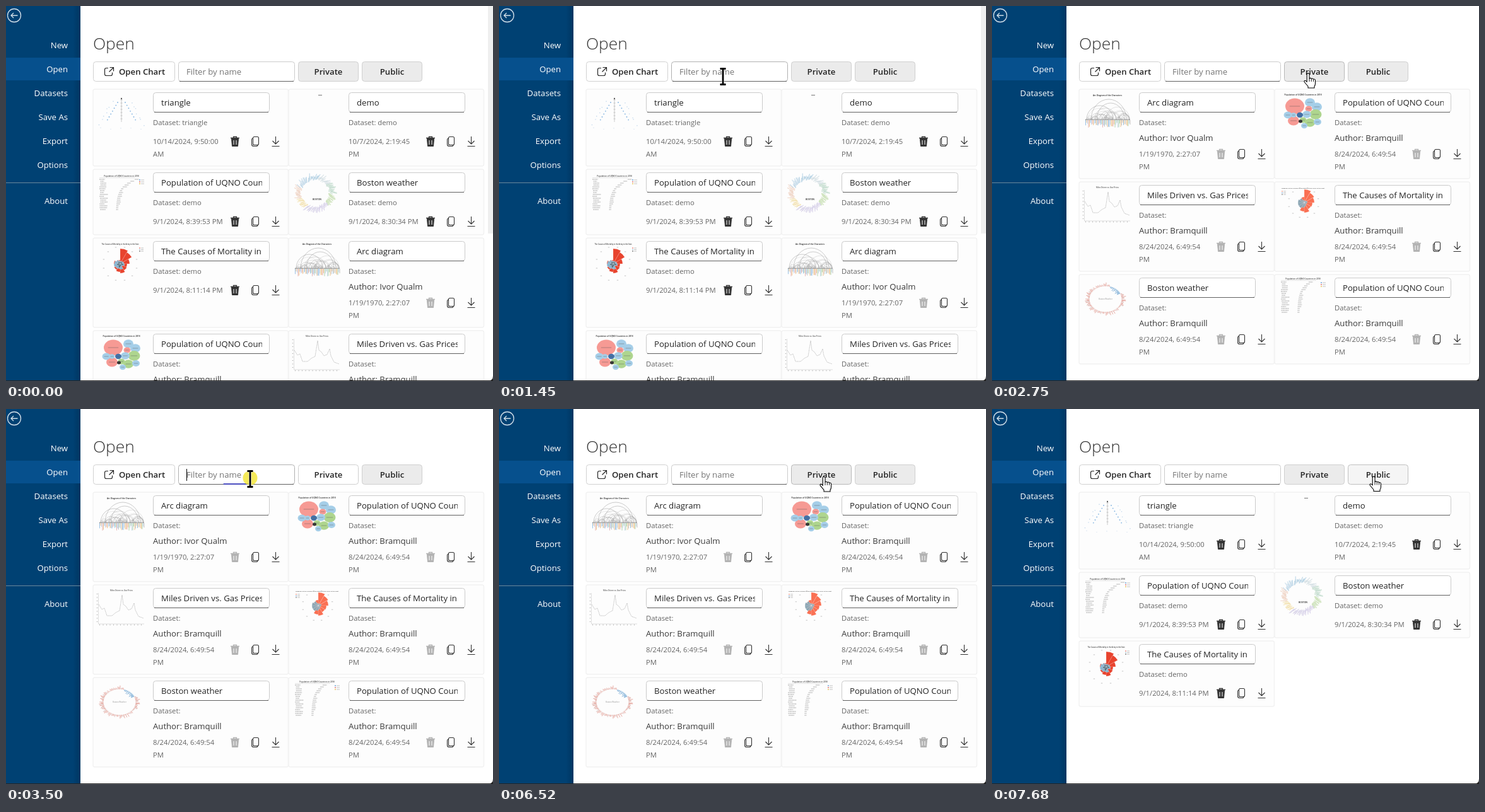
Animation of 772 by 595 pixels, one loop 8 s. Source, as an HTML page:

```html
<!DOCTYPE html>
<html lang="en">
<head>
<meta charset="utf-8">
<title>Open chart</title>
<style>
  html, body { margin: 0; width: 100%; height: 100%; overflow: hidden; background: #fff; }
  svg { display: block; width: 100vw; height: 100vh; }
  text { font-family: "Open Sans", "Noto Sans", sans-serif; white-space: pre; }
</style>
</head>
<body>
<svg id="stage" viewBox="0 0 772 595" xmlns="http://www.w3.org/2000/svg"></svg>
<script>
const LOOP = 8000;
const FONT_SCALE = 0.94;
const INK = '#242424', MUTED = '#666';

// ---- drawing helpers ----
const text = (x, y, s, size, fill = INK, more = '') =>
  `<text x="${x}" y="${y}" font-size="${size * FONT_SCALE}" fill="${fill}" ${more}>${s}</text>`;
const tiny = (x, y, s, size = 3.2, fill = '#444') =>
  text(x, y, s, size, fill, 'text-anchor="middle" font-weight="600"');
const rect = (x, y, w, h, fill, more = '') =>
  `<rect x="${x}" y="${y}" width="${w}" height="${h}" fill="${fill}" ${more}/>`;
const path = (d, stroke, width = 1, fill = 'none', more = '') =>
  `<path d="${d}" stroke="${stroke}" stroke-width="${width}" fill="${fill}" ${more}/>`;
const dot = (x, y, r, fill) => `<circle cx="${x}" cy="${y}" r="${r}" fill="${fill}"/>`;
const group = (x, y, body, id = '') => `<g ${id && `id="${id}"`} transform="translate(${x} ${y})">${body}</g>`;
const repeat = (n, fn) => Array.from({ length: n }, (_, i) => fn(i)).join('');
const random = seed => () => (seed = (seed * 16807) % 2147483647) / 2147483647;
const polar = (cx, cy, r, a, squash = 1) => [cx + r * Math.cos(a), cy + r * squash * Math.sin(a)];

// ---- thumbnails, in card coordinates ----
function triangleThumb() {
  const r = random(41);
  const sides = repeat(7, i => [-1, 1].map(s =>
    dot(45 + s * (6 + i * 2.7), 21 + i * 4.6, .9, '#7fb2e0') +
    dot(45 + s * (13 + i * 3.3 + r() * 4), 17 + i * 6 + r() * 6, .8, '#c3d8ec')).join(''));
  const ticks = repeat(7, i => `M43.5 ${17 + i * 5}h3`);
  return path('M45 13V52' + ticks, '#999', .5) + dot(45, 15, 1, '#333') + sides +
    repeat(5, i => dot(12 + i * 16, 61 + r() * 3, .6, '#c5d6e8'));
}

const demoThumb = () => path('M47 9.5h6', '#888', 1.2);

function barsThumb(dy = 0, span = 30) {
  const r = random(17);
  const rows = repeat(17, i => {
    const y = 16 + i * 3, end = 36 + span * Math.exp(-i / 4);
    return path(`M${10 + r() * 2} ${y}H${17 + r() * 7}`, '#999', .9, 'none', 'stroke-dasharray="2 .5"') +
      path(`M${end} ${y}h${3 + r() * 4}`, '#999', .9, 'none', 'stroke-dasharray="1.5 .4"');
  });
  const legend = ['#5b9bd5', '#d66', '#e5c04a'].map((c, i) =>
    dot(74, 17 + i * 3, .9, c) + path(`M76 ${17 + i * 3}h5`, '#aaa', .7)).join('');
  return group(0, dy, tiny(45, 12, 'Population of UQNO Countries in 2018') +
    path('M10 13.5H66', '#bbb', .4) + rows + legend);
}

function wreathThumb() {
  const r = random(77);
  const colors = ['#cfe3bd', '#d9d3ea', '#dbd6ea', '#f3e3b5', '#f0d6c8', '#c5dbea', '#bcd6e6', '#d8e2e6', '#c8dfd2'];
  const rays = repeat(150, i => {
    const a = i / 150 * 2 * Math.PI, inner = 21 + r() * 4, outer = inner + 3 + r() * 8;
    const [x1, y1] = polar(42, 38, inner, a, .95), [x2, y2] = polar(42, 38, outer, a + .1, .93);
    return path(`M${x1} ${y1}L${x2} ${y2}`, colors[Math.floor(i / 150 * 9)], 1.1);
  });
  return rays + tiny(45, 49, 'BOSTON', 3.6, '#222');
}

function ringThumb() {
  const r = random(29);
  const rays = repeat(110, i => {
    const a = i / 110 * 2 * Math.PI, blue = i > 87 && i < 103;
    const inner = blue ? 18 + r() * 6 : 25.5, outer = blue ? 26 : 27 + r() * 6;
    const [x1, y1] = polar(42, 39, inner, a, .8), [x2, y2] = polar(42, 39, outer, a, .8);
    return path(`M${x1} ${y1}L${x2} ${y2}`, blue ? '#7fb0d8' : i % 4 ? '#e6aaa2' : '#ddc9c6', 1);
  });
  return rays + tiny(42, 40, 'Boston Weather', 3, '#aaa');
}

function rose(cx, cy, radii, fill) {
  return radii.map((r, i) => {
    const a = (i / radii.length - .25) * 2 * Math.PI, b = a + 2 * Math.PI / radii.length;
    return path(`M${cx} ${cy}L${polar(cx, cy, r, a)}A${r} ${r} 0 0 1 ${polar(cx, cy, r, b)}Z`, '#fff', .15, fill);
  }).join('');
}

const months = (cx, cy, r) => repeat(12, i => {
  const [x, y] = polar(cx, cy, r, (i + .5) * Math.PI / 6);
  return path(`M${x - 1.2} ${y}h2.4`, '#aaa', .7);
});

const keyMarks = (x, y, colors) => colors.map((c, i) =>
  dot(x, y + i * 2.5, .8, c) + path(`M${x + 2} ${y + i * 2.5}h4`, '#999', .6)).join('');

function mortalityThumb() {
  return tiny(43, 11, 'The Causes of Mortality in the Army in the East', 2.8) + months(43, 41, 27) +
    rose(43, 41, [24, 21, 15, 11, 12, 15, 13, 11, 9, 10, 7, 6], '#e8432e') +
    rose(43, 41, [4, 5, 6, 7, 5, 9, 8, 9, 10, 9, 7, 5], '#86b3cf') +
    rose(43, 41, [3, 4, 3, 5, 3, 4, 6, 4, 5, 3, 4, 3], '#4b6675') +
    keyMarks(74, 16, ['#e8432e', '#86b3cf', '#333']);
}

function diagramThumb() {
  return tiny(45, 11, 'Diagram of the Causes of Mortality in the Army in the East', 2.6) + months(46, 33, 24) +
    rose(47, 33, [21, 18, 16, 13, 12, 16, 14, 8, 7, 7, 8, 9], '#fa7053') +
    rose(47, 33, [3, 4, 5, 4, 4, 6, 8, 10, 10, 10, 8, 4], '#8ca6b4') +
    keyMarks(12, 15, ['#fa7053', '#5b9bd5', '#555']);
}

function arcThumb() {
  const r = random(53);
  const arcs = repeat(46, () => {
    const x = 12 + r() * 58, w = Math.min(80 - x, 3 + r() * r() * 44);
    return path(`M${x} 48a${w / 2} ${w / 2 * 1.05} 0 0 1 ${w} 0`, '#888', .3 + r() * .35, 'none', 'opacity=".5"');
  });
  const big = path('M19 48a28 32 0 0 1 56 0M28 48a22 26 0 0 1 44 0M12 48a21 22 0 0 1 42 0', '#999', .5);
  const colors = ['#9cc89b', '#ebb878', '#7fb2de', '#b9cfe4', '#dfa0a0', '#b5b5b5'];
  const leaves = repeat(48, i => path(`M${10.5 + i * 1.5} 49v${4 + r() * 8}`, colors[Math.floor(r() * 6)], .8));
  return tiny(45, 11, 'Arc Diagram of the Characters', 3.4, '#222') + arcs + big +
    path('M10 48.3H81', '#555', 1, 'none', 'stroke-dasharray="1.5 .8"') + leaves;
}

function bubblesThumb() {
  const red = '#f69a94', blue = '#a5cee8', green = '#aed58e';
  const bubbles = [[32, 27, 15, red], [56, 21, 8, blue], [67, 28, 8, blue], [54, 31, 5.5, red], [65, 40, 9.5, green],
    [51, 40, 7, blue], [30, 50, 9, red], [40, 41, 5, '#4472a8'], [21, 41, 6.5, blue], [45, 49, 5.5, green],
    [56, 53, 8, green], [68, 52, 6, blue], [47, 58, 5, blue], [30, 41, 4.5, blue], [41, 51, 3, '#333']];
  return tiny(45, 10, 'Population of UQNO Countries in 2018', 3.4, '#222') +
    bubbles.map(([x, y, r, c]) => `<ellipse cx="${x}" cy="${y}" rx="${r}" ry="${r * .83}" fill="${c}"/>` +
      path(`M${x - r * .55} ${y}h${r * 1.1}`, '#555', .6, 'none', 'opacity=".7"')).join('');
}

function milesThumb() {
  const line = 'M9 31 14 39 18 37 22 49 30 49 36 44 42 41 46 16 48 31 52 34 56 40 61 38 65 29 67 40 72 50 80 53';
  return tiny(45, 10, 'Miles Driven vs. Gas Prices', 3, '#555') + path(line, '#aaa', .6, 'none', 'stroke-dasharray="2 .6"') +
    path('M8.5 13V62H81', '#ccc', .6) +
    path('M6.5 14V62M10 63.5H81', '#aaa', 1.4, 'none', 'stroke-dasharray="1 4.5"');
}

// ---- cards ----
const AUTHOR = 'Bramquill', MORTALITY = 'The Causes of Mortality in the Army', POPULATION = 'Population of UQNO Countries';
const mine = (title, dataset, date, thumb) => ({ title, dataset, date, thumb });
const shared = (title, thumb, author = AUTHOR, date = ['8/24/2024, 6:49:54', 'PM']) =>
  ({ title, dataset: '', author, date, thumb });

const own = [
  mine('triangle', 'triangle', ['10/14/2024, 9:50:00', 'AM'], triangleThumb()),
  mine('demo', 'demo', ['10/7/2024, 2:19:45', 'PM'], demoThumb()),
  mine(POPULATION, 'demo', ['9/1/2024, 8:39:53 PM'], barsThumb()),
  mine('Boston weather', 'demo', ['9/1/2024, 8:30:34 PM'], wreathThumb()),
  mine(MORTALITY, 'demo', ['9/1/2024, 8:11:14 PM'], mortalityThumb()),
];
const gallery = [
  shared('Arc diagram', arcThumb(), 'Ivor Qualm', ['1/19/1970, 2:27:07', 'PM']),
  shared(POPULATION, bubblesThumb()),
  shared('Miles Driven vs. Gas Prices', milesThumb()),
  shared(MORTALITY, diagramThumb()),
  shared('Boston weather', ringThumb()),
  shared(POPULATION, barsThumb(-4, 18)),
];

function actions(y, disabled) {
  const c = disabled ? '#b3b3b3' : '#333';
  const trash = path('M-7-5.5H7', c, 1.5) + path('M-2.5-6v-1.5h5V-6', c, 1.3) +
    path('M-5.5-4.5h11l-1 12h-9z', c, 1, c, 'stroke-linejoin="round"') + path('M-2-2v7M2-2v7', '#fff', 1);
  const copy = path('M-1.5-7.5h5a2 2 0 0 1 2 2v9a2 2 0 0 1-2 2h-5a2 2 0 0 1-2-2v-9a2 2 0 0 1 2-2z' +
    'M-4-5q-1.5.5-1.5 2v7.5a3 3 0 0 0 3 3H2q1.5 0 2-1.5', '#333', 1.1);
  const download = path('M.5-8V4M-4.5-1 .5 4 5.5-1M-5.5 7.5h12', '#333', 1.1);
  return group(225, y, trash) + group(257, y, copy) + group(289, y, download);
}

const inputBox = (x, y, w, id = '') =>
  rect(x + .5, y + .5, w - 1, 31, '#fff', `${id && `id="${id}"`} rx="4" stroke="#cbcbcb"`) +
  path(`M${x + 2} ${y + 31.5}H${x + w - 2}`, '#616161');

const cardHeight = c => c.author ? 142 : c.date.length > 1 ? 122 : 104;

function card(c, h) {
  const dateY = c.author ? 103 : 83;
  return rect(0, 0, 309.5, h, '#fdfdfd', 'rx="3" stroke="#f2f2f2" stroke-width="1.5"') + c.thumb +
    inputBox(95, 5, 185) + `<g clip-path="url(#titleClip)">${text(108, 26, c.title, 14)}</g>` +
    text(95, 57, `Dataset: ${c.dataset}`, 12, MUTED) +
    (c.author ? text(95, 82, `Author: ${c.author}`, 14, '#3a3a3a') : '') +
    c.date.map((line, i) => text(95, dateY + 4 + i * 20, line, 12, MUTED)).join('') +
    actions(dateY, !!c.author);
}

function list(id, cards) {
  let y = 132, out = '';
  for (let i = 0; i < cards.length; i += 2) {
    const row = cards.slice(i, i + 2);
    const h = Math.max(...row.map(cardHeight));
    out += row.map((c, k) => group(138 + k * 310, y, card(c, h))).join('');
    y += h + 5;
  }
  return group(0, 0, out, id);
}

// ---- page ----
function sidebar() {
  const items = ['New', 'Open', 'Datasets', 'Save As', 'Export', 'Options'];
  const item = (s, y) => text(98, y, s, 14, '#fff', 'text-anchor="end"');
  return rect(0, 0, 118, 595, '#004173') + rect(106, 0, 12, 595, 'url(#edge)') +
    rect(0, 82, 118, 36, '#06508d') +
    items.map((s, i) => item(s, 67 + i * 38)).join('') + item('About', 314) +
    rect(0, 280, 118, 1, '#6d879c') +
    `<circle cx="13" cy="15" r="10.5" fill="none" stroke="#d3dfe9" stroke-width="1.3"/>` +
    path('M18.5 15H8M12 11 8 15l4 4', '#d3dfe9', 1.3);
}

const toggle = (id, x, label) => rect(x + .5, 88.5, 95, 31, '#ebebeb', `id="${id}" rx="4" stroke="#cfcfcf"`) +
  text(x + 48, 109, label, 14, INK, 'text-anchor="middle" font-weight="600"');

const BEAM = 'M-4.5-12.5h3.5l1 1 1-1h3.5M-4.5 12.5h3.5l1-1 1 1h3.5M0-11.5v23';
const pointers = {
  arrow: path('M0 0V17l4-3.5 3 6.5 3-1.3-3-6.4h5.5z', '#000', 1, '#fff'),
  beam: path(BEAM, '#fff', 4.2) + path(BEAM, '#000', 2.8),
  hand: path('M-1.8.5a1.9 1.9 0 0 1 3.8 0V7q2-1.5 3.3.5 2-1.2 3.2.7 3-.7 3 2.3v4.5q0 2.5-1.5 4.5V22H0v-2.5' +
    'L-5.5 13q-1.5-2.5.8-2.8 1.5 0 2.9 2.3z', '#000', 1.1, '#fff', 'stroke-linejoin="round"') +
    path('M2 7v5M5.3 8v4M8.5 8.5v3.5', '#000', .9),
};

document.getElementById('stage').innerHTML = `<defs>
  <linearGradient id="edge"><stop offset="0" stop-color="#002a50" stop-opacity="0"/>
  <stop offset="1" stop-color="#002a50" stop-opacity=".5"/></linearGradient>
  <clipPath id="titleClip"><rect x="107" y="6" width="161" height="30"/></clipPath></defs>` +
  rect(0, 0, 772, 595, '#fff') + sidebar() +
  text(138, 69, 'Open', 28, '#333', 'font-weight="300"') +
  rect(138.5, 88.5, 129, 31, '#fff', 'rx="4" stroke="#d1d1d1"') +
  path('M162 98.5h-3a2.5 2.5 0 0 0-2.5 2.5v7a2.5 2.5 0 0 0 2.5 2.5h7a2.5 2.5 0 0 0 2.5-2.5v-2.5M164.5 97.5h6v6M170 98l-6.5 6.5', INK, 1.2) +
  text(179, 109, 'Open Chart', 14, INK, 'font-weight="600"') +
  inputBox(273, 88, 185, 'filter') + text(286, 109, 'Filter by name', 14, '#757575') +
  rect(0, 118, 0, 2, '#4b4fc0', 'id="underline"') + rect(286, 95, 1, 19, '#000', 'id="caret"') +
  toggle('private', 463, 'Private') + toggle('public', 564, 'Public') +
  list('all', [...own, ...gallery.slice(0, 3)]) + list('shared', gallery) + list('own', own) +
  rect(764, 0, 8, 361, '#efefef', 'id="scrollbar"') +
  rect(0, 594, 772, 1, '#262626') + path('M772 587q0 8-9 8h9z', 'none', 0, '#222') +
  `<g id="pointer"><circle id="press" cy="-1.5" r="11.5" fill="#f3e531" opacity=".8"/>` +
  Object.entries(pointers).map(([k, body]) => group(0, 0, body, k)).join('') + '</g>';

// ---- timeline ----
const track = [ // time, x, y
  [130, 764, 555], [360, 690, 380], [600, 560, 160], [900, 432, 8], [970, 420, 4], [1180, 375, 80],
  [1450, 355, 112], [1590, 357, 112], [1740, 357, 112], [2020, 501, 108], [2950, 501, 108], [3130, 440, 111],
  [3300, 387, 111], [3500, 387, 111], [3640, 386, 110], [5960, 386, 110], [6250, 503, 109], [6480, 503, 109],
  [6790, 594, 108.5], [7550, 594, 108.5], [7680, 605, 108.5], [LOOP, 605, 108.5]];
const presses = [[2280, 2420], [3500, 3640], [6310, 6440], [6840, 6970]];
const FOCUS = 3500, BLUR = 6310, BLINK = 530;

const $ = id => document.getElementById(id);
const show = (id, on) => $(id).setAttribute('visibility', on ? 'visible' : 'hidden');
const within = (t, a, b) => t >= a && t < b;

function pointerAt(t) {
  const i = Math.max(1, track.findIndex(k => k[0] > t));
  const [t0, x0, y0] = track[i - 1], [t1, x1, y1] = track[i];
  const p = Math.max(0, (t - t0) / (t1 - t0));
  return [x0 + (x1 - x0) * p, y0 + (y1 - y0) * p];
}

function pointerKind(x, y) {
  if (!within(y, 88, 121)) return 'arrow';
  if (within(x, 273, 459)) return 'beam';
  return within(x, 463, 560) || within(x, 564, 661) ? 'hand' : 'arrow';
}

function render(t) {
  const view = within(t, 2720, 6620) ? 'shared' : t >= 7310 ? 'own' : 'all';
  ['all', 'shared', 'own'].forEach(id => $(id).setAttribute('display', id === view ? 'inline' : 'none'));
  show('scrollbar', view === 'all');

  const [x, y] = pointerAt(t), kind = pointerKind(x, y);
  $('pointer').setAttribute('transform', `translate(${x} ${y})`);
  $('pointer').setAttribute('display', t < 130 ? 'none' : 'inline');
  Object.keys(pointers).forEach(k => show(k, k === kind));
  show('press', presses.some(([a, b]) => within(t, a, b)));

  const focused = within(t, FOCUS, BLUR), hand = kind === 'hand';
  $('private').setAttribute('fill', focused ? '#fff' : '#ebebeb');
  $('public').setAttribute('fill', t >= 6840 ? '#f5f5f5' : '#ebebeb');
  $('private').setAttribute('stroke', hand && x < 561 ? '#b8b8b8' : '#cfcfcf');
  $('public').setAttribute('stroke', hand && x > 561 ? '#c0c0c0' : '#cfcfcf');
  $('filter').setAttribute('stroke', focused || kind === 'beam' ? '#b0b0b0' : '#cbcbcb');

  const rest = 1 - Math.min(1, Math.max(0, (t - FOCUS) / 210));
  const width = 183 * (1 - .78 * rest ** 2);
  $('underline').setAttribute('x', 365.5 - width / 2);
  $('underline').setAttribute('width', width);
  show('underline', focused);
  show('caret', focused && Math.floor((t - FOCUS) / BLINK - .01) % 2 <= 0);
}

const start = performance.now();
function tick() {
  render((performance.now() - start) % LOOP);
  requestAnimationFrame(tick);
}
tick();
</script>
</body>
</html>
```
